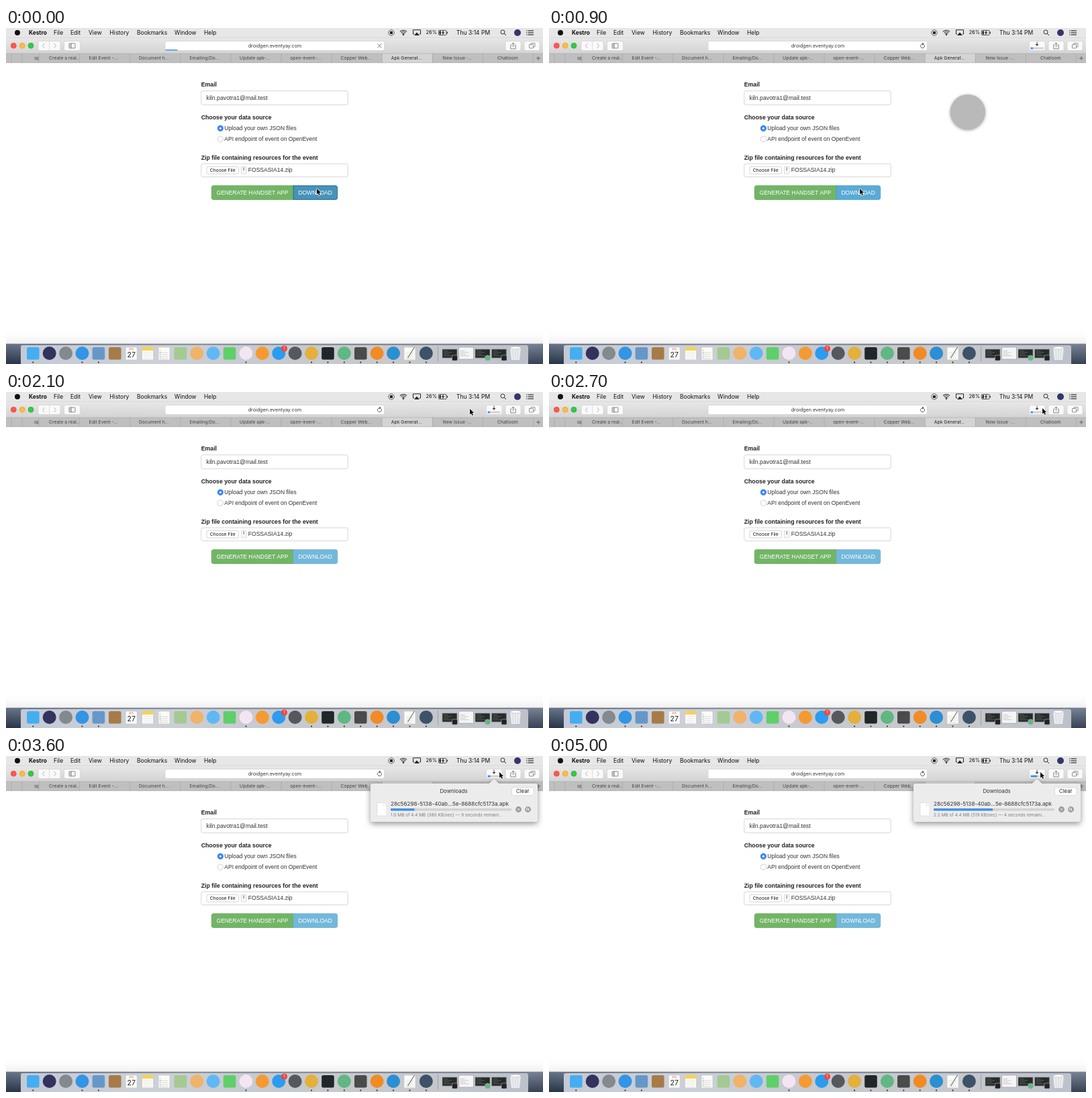
Animation of 800x500 px, one loop 5100 ms. Source, as an HTML page with a canvas:

```html
<!DOCTYPE html>
<html lang="en">
<head>
<meta charset="utf-8">
<title>Download demo</title>
<style>
html, body { margin: 0; width: 800px; height: 500px; overflow: hidden; background: #fff; }
canvas { display: block; }
</style>
</head>
<body>
<canvas id="stage" width="800" height="500"></canvas>
<script>
const ctx = document.getElementById('stage').getContext('2d');
const LOOP = 5100, STEP = 100;
const UI = 'Inter, sans-serif', PAGE = '"Liberation Sans", Arial, sans-serif';

function box(x, y, w, h, r, fill, stroke) {
  ctx.beginPath();
  ctx.roundRect(x, y, w, h, r);
  if (fill) { ctx.fillStyle = fill; ctx.fill(); }
  if (stroke) { ctx.strokeStyle = stroke; ctx.lineWidth = 0.7; ctx.stroke(); }
}

function disc(x, y, r, fill, stroke) {
  box(x - r, y - r, 2 * r, 2 * r, r, fill, stroke);
}

function line(points, color, width = 0.8) {
  ctx.beginPath();
  for (let i = 0; i < points.length; i += 2) ctx.lineTo(points[i], points[i + 1]);
  ctx.strokeStyle = color;
  ctx.lineWidth = width;
  ctx.stroke();
}

function arc(x, y, r, from, to, color, width = 0.9) {
  ctx.beginPath();
  ctx.arc(x, y, r, from, to);
  ctx.strokeStyle = color;
  ctx.lineWidth = width;
  ctx.stroke();
}

function poly(points, fill) {
  ctx.beginPath();
  for (let i = 0; i < points.length; i += 2) ctx.lineTo(points[i], points[i + 1]);
  ctx.closePath();
  ctx.fillStyle = fill;
  ctx.fill();
}

function text(str, x, y, size, { font = UI, color = '#222', weight = 400, align = 'left' } = {}) {
  ctx.font = `${weight} ${size}px ${font}`;
  ctx.textAlign = align;
  ctx.textBaseline = 'middle';
  ctx.fillStyle = color;
  ctx.fillText(str, x, y);
}

function gradient(x0, y0, x1, y1, ...colors) {
  const g = ctx.createLinearGradient(x0, y0, x1, y1);
  colors.forEach((c, i) => g.addColorStop(i / (colors.length - 1), c));
  return g;
}

function magnifier(x, y, r, color) {
  arc(x - r * 0.25, y - r * 0.25, r * 0.75, 0, 7, color);
  line([x + r * 0.3, y + r * 0.3, x + r, y + r], color, 1);
}

function menuBar() {
  box(0, 0, 800, 14, 0, '#e7e7e8');
  disc(17, 7, 4, '#111');
  text('Kestro', 34, 7.2, 8.4, { weight: 700, color: '#111' });
  [['File', 71], ['Edit', 96], ['View', 123], ['History', 154.5], ['Bookmarks', 195],
   ['Window', 251], ['Help', 295]].forEach(([s, x]) => text(s, x, 7.2, 8.5, { color: '#111' }));

  disc(574, 7, 4.2, null, '#222');
  box(572, 5, 4, 4, 0.5, '#222');
  for (const r of [2.5, 5, 7.5]) arc(592, 11, r, -2.3, -0.84, '#222', 1.1);
  disc(592, 10.3, 1, '#222');
  line([608, 9, 606.5, 9, 606.5, 2.8, 617.5, 2.8, 617.5, 9, 616, 9], '#222', 1);
  poly([612, 6.5, 616, 11, 608, 11], '#222');
  text('26%', 625.5, 7.2, 7.5, { color: '#111' });
  box(644.5, 3.5, 11.5, 7, 1, null, '#222');
  box(645.5, 4.5, 2.4, 5, 0, '#222');
  box(656.7, 5.5, 1.2, 3, 0.5, '#222');
  poly([652, 3, 648.8, 7.4, 650.8, 7.4, 650, 11, 653.3, 6.4, 651.4, 6.4], '#222');
  text('Thu 3:14 PM', 671, 7.2, 8.5, { color: '#111' });
  magnifier(741, 7, 4, '#222');
  disc(762, 7, 5, '#34356a');
  for (const y of [4, 7, 10]) {
    line([775, y, 776.3, y], '#222', 1.1);
    line([777.5, y, 786, y], '#222', 1.1);
  }
}

function toolButton(x, w) {
  box(x, 19.5, w, 14, 2.5, '#fafafa', '#d0d0d0');
}

function toolbar(t) {
  box(0, 14, 800, 24, 0, gradient(0, 14, 0, 38, '#e8e8e8', '#d3d3d3'));
  line([0, 14.2, 800, 14.2], '#cdcdcd', 0.6);
  disc(11.3, 26.3, 4, '#fc5753', '#df4744');
  disc(24.2, 26.3, 4, '#fdbc40', '#de9f34');
  disc(37, 26.3, 4, '#36c84b', '#27aa35');

  toolButton(48, 33);
  line([64.5, 20, 64.5, 33], '#d5d5d5');
  line([57.5, 23, 54.5, 26.5, 57.5, 30], '#aaa', 0.9);
  line([71.5, 23, 74.5, 26.5, 71.5, 30], '#aaa', 0.9);
  toolButton(86.5, 24);
  box(94, 23, 9, 7, 0.7, null, '#555');
  line([97, 23, 97, 30], '#555');
  for (const y of [24.7, 26.4, 28]) line([95, y, 96.2, y], '#555', 0.6);

  const loading = t < 700;
  box(237, 19.5, 326.5, 14, 2.5, '#fff', '#d0d0d0');
  text('droidgen.eventyay.com', 400.5, 26.8, 7.2, { align: 'center', color: '#333' });
  if (loading) {
    box(237.5, 32, 18, 1.4, 0.5, '#3c96f5');
    line([553.5, 23.5, 559.5, 29.5], '#555');
    line([559.5, 23.5, 553.5, 29.5], '#555');
  } else {
    arc(556.5, 26.8, 3, -0.7, 4.6, '#555');
    poly([556, 21.8, 559, 23.8, 556, 25.8], '#555');
    downloadButton(t);
  }

  toolButton(744, 23);
  line([753.5, 25.2, 751.8, 25.2, 751.8, 31, 759.2, 31, 759.2, 25.2, 757.5, 25.2], '#666');
  line([755.5, 28.5, 755.5, 22], '#666');
  line([753.5, 24, 755.5, 22, 757.5, 24], '#666');
  toolButton(772, 23);
  box(782, 22.5, 6, 5.5, 0.5, null, '#666');
  box(779.5, 24.5, 6, 5.5, 0.5, '#fafafa', '#666');
}

function downloadButton(t) {
  toolButton(715.5, 23.5);
  line([727, 20.7, 727, 26], '#444', 1);
  poly([724.5, 24, 729.5, 24, 727, 27], '#444');
  box(717.7, 28.7, 19, 2.8, 0.5, '#d2d2d2');
  box(717.7, 28.7, 19 * progress(t), 2.8, 0.5, '#3b8df0');
}

function tabs() {
  box(0, 38, 800, 14, 0, '#bfbfbf');
  box(560, 38, 75, 14, 0, '#d4d4d4');
  line([0, 38, 800, 38], '#adadad', 0.6);
  line([0, 51.7, 800, 51.7], '#aaa', 0.6);
  const edges = [8, 24, 49, 109.5];
  for (let x = 184.7; x < 790; x += 75.1) edges.push(x);
  edges.forEach(x => line([x, 38, x, 52], '#a7a7a7', 0.7));

  const clipped = (str, x, right) => {
    ctx.save();
    ctx.beginPath();
    ctx.rect(0, 38, right, 14);
    ctx.clip();
    text(str, x, 45, 6.8, { color: '#444' });
    ctx.restore();
  };
  clipped('open', 42, 48.5);
  clipped('Create a real...', 64, 109);
  ['Edit Event -...', 'Document h...', 'Emailing/Do...', 'Update apk-...', 'open-event-...',
   'Copper Web...', 'Apk Generat...', 'New Issue ·...', 'Chatloom'].forEach((s, i) =>
    text(s, 145 + i * 75.3, 45, 6.8, { align: 'center', color: i === 6 ? '#222' : '#444' }));
  line([790, 45, 796, 45], '#555');
  line([793, 42, 793, 48], '#555');
}

function form(t, cursor) {
  box(0, 52, 800, 418, 0, '#fff');
  const label = (s, y) => text(s, 290.7, y, 8.75, { font: PAGE, weight: 700 });
  const plain = (s, x, y, size = 8.6) => text(s, x, y, size, { font: PAGE, color: '#333' });

  label('Email', 84.6);
  box(290.8, 93.6, 218.4, 20.6, 2.5, '#fff', '#c4c4c4');
  plain('kiln.pavotra1@mail.test', 298.5, 104.6, 8.75);

  label('Choose your data source', 133.7);
  disc(319.4, 149.3, 4.2, '#3a87f7', '#2b72de');
  disc(319.4, 149.3, 1.5, '#fff');
  plain('Upload your own JSON files', 325.3, 149.5);
  disc(319.4, 165.2, 4.1, '#fff', '#bbb');
  plain('API endpoint of event on OpenEvent', 325.3, 165.2, 8.5);

  label('Zip file containing resources for the event', 193.2);
  box(290.8, 202, 218.4, 19.6, 2.5, '#fff', '#c4c4c4');
  box(299, 206.3, 47.5, 10.8, 2, '#fff', '#c3c3c3');
  text('Choose File', 322.8, 212.2, 6.8, { align: 'center', color: '#111' });
  box(350.5, 206.5, 7.5, 10.5, 0.5, '#f7f7f7', '#d0d0d0');
  line([354.2, 207.5, 354.2, 212], '#666', 1);
  plain('FOSSASIA14.zip', 360.7, 212);

  const hover = cursor.x > 428 && cursor.x < 494 && cursor.y > 234;
  const [fill, edge] = t < 700 ? ['#4793b9', '#2f7399'] : hover ? ['#5aaad5', '#489fce'] : ['#73b8da', '#66afd4'];
  box(306.2, 234.6, 121.8, 20.8, [3, 0, 0, 3], '#72b566', '#62a656');
  box(428, 234.6, 65.8, 20.8, [0, 3, 3, 0], fill, edge);
  if (t < 700) {
    ctx.setLineDash([1, 1]);
    box(428.4, 235, 65, 20, [0, 3, 3, 0], null, '#245c7c');
    ctx.setLineDash([]);
  }
  const caption = (s, x, size) => text(s, x, 245.6, size, { font: PAGE, color: '#fff', align: 'center' });
  caption('GENERATE HANDSET APP', 367, 8.35);
  caption('DOWNLOAD', 460.7, 8.6);
}

const dockX = i => 40.3 + i * 24.4;

function sheet(x, head, rule) {
  box(x - 8.5, 475, 17, 19, 1.5, '#fbfbf8', '#c6c6c6');
  if (head) box(x - 8.5, 475, 17, 5, [1.5, 1.5, 0, 0], head);
  if (rule) for (let y = 483; y < 493; y += 3) line([x - 6, y, x + 6, y], rule, 0.6);
}

function miniWindow(x, dark, badge) {
  box(x - 11, dark ? 478 : 475, 22, dark ? 13 : 18, 0.5, dark ? '#252b2b' : '#f5f5f5', '#999');
  for (let i = 0; i < 4; i++) {
    const y = 480.5 + i * 2.4;
    line([x - 9, y, x - 2 + (i * 5) % 9, y], dark ? '#74806f' : '#aaa', 0.6);
  }
  if (badge) box(x + 3.5, 487, 8, 8, badge === '#222' ? 1.5 : 4, badge, '#aaa');
}

function dock() {
  // Soft shade on the page just above the dock.
  box(0, 446, 800, 24, 0, gradient(0, 446, 0, 470, 'rgba(0,0,0,0)', 'rgba(0,0,0,.012)', 'rgba(0,0,0,.06)'));
  box(0, 470, 800, 30, 0, gradient(0, 0, 800, 0, '#34455f', '#687286', '#5b6375', '#4a5872'));
  box(0, 470, 800, 30, 0, gradient(0, 470, 0, 500, 'rgba(255,255,255,.25)', 'rgba(0,0,0,.25)'));
  line([0, 470, 800, 470], '#8d929b', 0.6);
  box(22, 472, 756, 32, [3, 3, 0, 0],
    gradient(22, 0, 778, 0, '#c3cad5', '#cdd0d6', '#c6c9cf', '#c8c9cc', '#bcc1ca'));

  const icons = [
    ['sq', '#45aef0'], ['o', '#34325f'], ['o', '#84898e'], ['o', '#3295e5'], ['sq', '#6697c8'],
    ['sq', '#a77b48'], null, null, null, ['sq', '#a4c991'],
    ['o', '#f0b36a'], ['o', '#5fb8f4'], ['sq', '#5fcf69'], ['o', '#f3e6f2'], ['o', '#f59a32'],
    ['o', '#2b9cf0'], ['o', '#55585c'], ['o', '#e3b03c'], ['sq', '#20272a'], ['o', '#60b783'],
    ['sq', '#4b4b4b'], ['o', '#f18b26'], ['o', '#2b8fd3'], null, ['o', '#3d5268']
  ];
  icons.forEach((icon, i) => {
    if (!icon) return;
    const [kind, color] = icon, x = dockX(i);
    if (kind === 'o') disc(x, 484, 10, color);
    else box(x - 9.3, 475, 18.6, 18.6, 2.5, color);
  });

  const cal = dockX(6);
  sheet(cal);
  text('JUL', cal, 478.2, 4, { align: 'center', color: '#e54b40' });
  text('27', cal, 486.5, 10.5, { align: 'center', color: '#222' });
  sheet(dockX(7), '#f9d252', '#ddd');
  sheet(dockX(8), null, '#c5c5c5');
  for (let i = 0; i < 4; i++) disc(dockX(8) - 6, 480 + i * 3.5, 0.8, ['#e86', '#5ae', '#8c6', '#ca7'][i]);
  sheet(dockX(23), null, '#d2d2d2');
  line([dockX(23) - 3, 491, dockX(23) + 7, 475], '#777', 1.3);

  disc(414.5, 477, 4.6, '#f4423d');
  text('1', 414.5, 477.2, 6, { align: 'center', color: '#fff' });
  [0, 3, 4, 13, 17, 18, 19, 20, 21, 22, 23, 24].forEach(i => disc(dockX(i), 497.5, 1.1, '#222'));

  line([643.5, 474, 643.5, 496], '#8d94a0', 0.7);
  miniWindow(661, true, '#222');
  miniWindow(685.5, false);
  miniWindow(710, true, '#60b783');
  miniWindow(734.5, true, '#222');

  poly([751, 476, 767, 476, 765, 494, 753, 494], 'rgba(240,242,244,.9)');
  ctx.beginPath();
  ctx.ellipse(759, 476, 8, 2, 0, 0, 7);
  ctx.fillStyle = '#fff';
  ctx.fill();
  ctx.strokeStyle = '#aaa';
  ctx.lineWidth = 0.6;
  ctx.stroke();
  for (const d of [-4, 0, 4]) line([759 + d, 479, 759 + d * 0.8, 493], '#c3c7cb', 0.6);
}

// The downloaded item travels along a quadratic curve to the toolbar.
function flyingItem(t) {
  const p = (t - 600) / 500;
  if (p < 0.2 || p >= 1) return;
  const bend = (a, b, c) => (1 - p) ** 2 * a + 2 * p * (1 - p) * b + p * p * c;
  ctx.save();
  ctx.shadowColor = 'rgba(0,0,0,.4)';
  ctx.shadowBlur = 4;
  ctx.shadowOffsetY = 1;
  disc(bend(463, 600, 727), bend(239, 161, 26), p > 0.7 ? 20 : 26, '#b9b9b9');
  ctx.restore();
}

const reports = [
  [3100, '738 KB of 4.4 MB — 10 seconds remaining', 0.195],
  [3400, '1.0 MB of 4.4 MB (380 KB/sec) — 9 seconds remaini...', 0.198],
  [4000, '1.4 MB of 4.4 MB (429 KB/sec) — 7 seconds remaini...', 0.32],
  [4500, '1.8 MB of 4.4 MB (476 KB/sec) — 5 seconds remaini...', 0.41],
  [4900, '2.2 MB of 4.4 MB (519 KB/sec) — 4 seconds remaini...', 0.49]
];
const report = t => reports.filter(r => r[0] <= t).pop();
const progress = t => t < 3100 ? 0.17 : report(t)[2];

function popover(t) {
  if (t < 3100) return;
  const opening = t < 3200, scale = opening ? 1.112 : 1;
  ctx.save();
  ctx.translate(727, 34);
  ctx.scale(scale, scale);
  ctx.translate(-727, -34);
  ctx.globalAlpha = opening ? 0.8 : 1;

  ctx.save();
  ctx.shadowColor = `rgba(0,0,0,${opening ? 0.2 : 0.42})`;
  ctx.shadowBlur = 9;
  ctx.shadowOffsetY = 3;
  ctx.beginPath();
  ctx.roundRect(543, 41, 249, 57, 3);
  ctx.moveTo(719.5, 41);
  ctx.lineTo(727, 34.3);
  ctx.lineTo(734.5, 41);
  ctx.closePath();
  ctx.fillStyle = '#ececec';
  ctx.fill();
  ctx.restore();

  const [, status, done] = report(t);
  text('Downloads', 667, 53, 7.8, { align: 'center', color: '#333' });
  box(753.5, 47, 32.5, 11.7, 2, '#fff', '#d0d0d0');
  text('Clear', 769.7, 53, 7.8, { align: 'center' });
  poly([553, 69.5, 562.5, 69.5, 567.3, 74.3, 567.3, 89, 553, 89], '#fff');
  line([553, 69.5, 562.5, 69.5, 562.5, 74.3, 567.3, 74.3, 567.3, 89, 553, 89, 553, 69.5], '#cfcfcf', 0.5);
  text('28c56298-5138-40ab...5e-8688cfc5173a.apk', 573, 72, 8.15, { color: '#333' });
  box(573, 78, 180, 3.4, 1, '#d2d2d2');
  box(573, 78, 180 * done, 3.4, 1, '#4591e8');
  if (opening) for (let x = 575; x < 607; x += 4) line([x, 81.2, x + 2, 78.2], '#a5cdf7', 1);
  text(status, 573, 88.2, 6.5, { color: '#7c7c7c' });
  disc(763.5, 79.5, 4.4, '#9b9b9b');
  line([761.8, 77.8, 765.2, 81.2], '#fff');
  line([765.2, 77.8, 761.8, 81.2], '#fff');
  disc(777.5, 79.5, 4.4, '#9b9b9b');
  magnifier(777.5, 79.5, 2.2, '#fff');
  ctx.restore();
}

const path = [[0, 463, 239], [1500, 463, 239], [2100, 691, 25], [2500, 735, 24],
  [4200, 735, 24], [5000, 732, 24], [LOOP, 732, 24]];

function cursorAt(t) {
  const i = path.findIndex(k => k[0] > t);
  const [t0, x0, y0] = path[i - 1], [t1, x1, y1] = path[i];
  const p = (t - t0) / (t1 - t0), e = p * p * (3 - 2 * p);
  return { x: x0 + (x1 - x0) * e, y: y0 + (y1 - y0) * e };
}

function pointer({ x, y }) {
  ctx.save();
  ctx.translate(x, y);
  const shape = [0, 0, 0, 8.6, 2, 6.9, 3.5, 10, 5, 9.3, 3.6, 6.3, 6.2, 6.1];
  ctx.lineJoin = 'round';
  line([...shape, 0, 0], '#fff', 1.5);
  poly(shape, '#111');
  ctx.restore();
}

function draw() {
  const t = Math.floor((performance.now() % LOOP) / STEP) * STEP;
  const cursor = cursorAt(t);
  form(t, cursor);
  menuBar();
  toolbar(t);
  tabs();
  dock();
  popover(t);
  flyingItem(t);
  pointer(cursor);
  requestAnimationFrame(draw);
}
draw();
</script>
</body>
</html>
```
